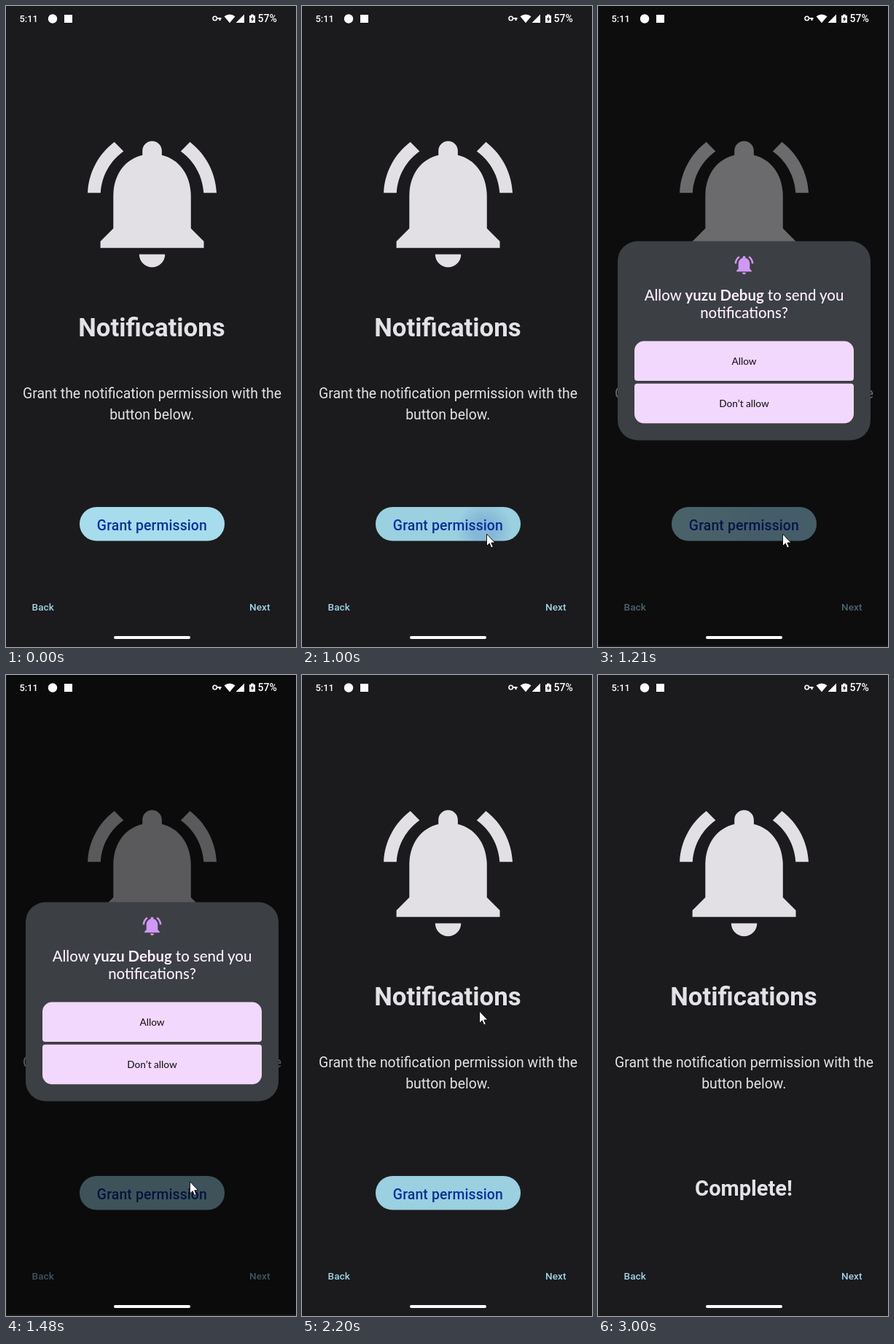
These frames come from a looping animation (398x879 px, 3.54 s). An HTML page:

```html
<!DOCTYPE html>
<html lang="en">
<head>
<meta charset="utf-8">
<title>Notification permission</title>
<style>
  html, body { margin: 0; height: 100%; overflow: hidden; background: #1b1b1d; }
  svg { display: block; width: 100vw; height: 100vh; font-family: Roboto, sans-serif; fill: #e3e2e6; }
  .mid { text-anchor: middle; }
  .body { font-size: 19.4px; }
  .nav { font-size: 13.55px; font-weight: 500; fill: #a0d3e6; letter-spacing: .007em; }
  .status { fill: #fff; font-weight: 500; }
  #dialog { font-family: Lato, sans-serif; fill: #fbeeff; }
  #dialog .title { font-size: 20.4px; font-weight: 500; }
  #dialog .label { font-size: 13.6px; font-weight: 500; fill: #1c1b1f; }
</style>
</head>
<body>
<svg viewBox="0 0 398 879">
  <defs>
    <path id="bell" d="M7.58 4.08 6.15 2.65C3.75 4.48 2.17 7.3 2.03 10.5h2c.15-2.65 1.51-4.97 3.55-6.42zm12.39 6.42h2c-.15-3.2-1.73-6.02-4.12-7.85l-1.42 1.43c2.02 1.45 3.39 3.77 3.54 6.42zM18 11c0-3.07-1.64-5.64-4.5-6.32V4c0-.83-.67-1.5-1.5-1.5s-1.5.67-1.5 1.5v.68C7.63 5.36 6 7.92 6 11v5l-2 2v1h16v-1l-2-2zM12 22c1.1 0 2-.9 2-2h-4c0 1.1.9 2 2 2z"/>
    <clipPath id="pill"><rect x="101" y="687" width="199" height="46.500" rx="23.2"/></clipPath>
    <radialGradient id="glow">
      <stop offset=".4" stop-color="#0a2f9c"/>
      <stop offset="1" stop-color="#0a2f9c" stop-opacity="0"/>
    </radialGradient>
  </defs>

  <use href="#bell" transform="translate(94.1 163.1) scale(8.87)" fill="#e2e0e5"/>
  <g class="mid">
    <text x="200" y="453" font-size="34.85" font-weight="700">Notifications</text>
    <text class="body" x="200.5" y="537.5">Grant the notification permission with the</text>
    <text class="body" x="200.2" y="566.5">button below.</text>
    <text id="complete" x="200" y="714" font-size="29.05" font-weight="700">Complete!</text>
    <g id="button">
      <g clip-path="url(#pill)">
        <rect x="101" y="687" width="199" height="47" fill="#a6dcec"/>
        <rect id="hover" x="101" y="687" width="199" height="47" fill="#00344f"/>
        <circle id="ripple" cx="250" cy="718" fill="url(#glow)"/>
      </g>
      <text x="200.4" y="718.500" font-size="19.36" font-weight="500" letter-spacing=".14" fill="#0a2f9c">Grant permission</text>
    </g>
  </g>
  <text class="nav" x="35.500" y="829">Back</text>
  <text class="nav" x="334" y="829">Next</text>

  <rect id="dim" x="1" width="397" height="877" fill="#000"/>

  <g class="status">
    <text x="18.500" y="22" font-size="12.8">5:11</text>
    <circle cx="64" cy="17.500" r="6.200"/>
    <rect x="80" y="12" width="11" height="11"/>
    <path d="M290 17h5.500M293.500 17v3" stroke="#fff" stroke-width="2" fill="none"/>
    <circle cx="286.700" cy="17" r="2.700" stroke="#fff" stroke-width="1.600" fill="none"/>
    <path d="M299.500 14.200q7.500-5.600 15 0l-7.500 9zM327 11.500V23h-11.500z"/>
    <path d="M334 13h2.200v-1.500h3.600V13h2.200v10h-8z"/>
    <path d="M339 14l-3.200 4.500h2L337 22l3.400-4.700h-2z" fill="#1b1b1d"/>
    <text x="345.500" y="22" font-size="14">57%</text>
  </g>
  <rect x="148" y="864" width="105" height="4" rx="2" fill="#fff"/>

  <g id="dialog" class="mid">
    <rect x="27" width="347" height="272.800" rx="27" fill="#3c3f43"/>
    <use href="#bell" transform="translate(184.900 16.900) scale(1.3)" fill="#d197f8"/>
    <text class="title" x="200.5" y="81">Allow <tspan font-weight="700">yuzu Debug</tspan> to send you</text>
    <text class="title" x="200.5" y="105.500">notifications?</text>
    <g fill="#f3d8fd">
      <path d="M50 150a13 13 0 0 1 13-13h275a13 13 0 0 1 13 13v37.500a4 4 0 0 1-4 4H54a4 4 0 0 1-4-4z"/>
      <path d="M50 199.200a4 4 0 0 1 4-4h293a4 4 0 0 1 4 4v37.500a13 13 0 0 1-13 13H63a13 13 0 0 1-13-13z"/>
    </g>
    <text class="label" x="200.5" y="169">Allow</text>
    <text class="label" x="200.5" y="227.300">Don’t allow</text>
  </g>

  <path id="cursor" d="M.5 0V16.500L4.300 13 6.700 18.800 9.300 17.700 6.900 12H12z" fill="#fff" stroke="#111" stroke-linejoin="round"/>
</svg>
<script>
const LOOP = 3540, STEP = 200 / 3;
const el = Object.fromEntries([...document.querySelectorAll('[id]')].map(e => [e.id, e]));
const ramp = (t, from, to) => Math.min(1, Math.max(0, (t - from) / (to - from)));
const smooth = x => x * x * (3 - 2 * x);
const mix = (a, b, k) => a.map((v, i) => v + (b[i] - v) * k);
const show = (e, on) => e.setAttribute('visibility', on ? 'visible' : 'hidden');

const ENTRY = [333, 562], GRANT = [253, 724], ALLOW = [243, 461], EXIT = [361, 540];

function cursorAt(t) {
  if (t < 1340) return mix(ENTRY, GRANT, 1 - (1 - ramp(t, 400, 600)) ** 2);
  if (t < 2600) return mix(GRANT, ALLOW, smooth(ramp(t, 1340, 1950)));
  return mix(ALLOW, EXIT, ramp(t, 2600, 2733) ** 2);
}

function draw(t) {
  const open = t > 1060 && t < 2190;
  const done = smooth(ramp(t, 2200, 2430));

  show(el.cursor, t > 390 && t < 2790);
  el.cursor.setAttribute('transform', `translate(${cursorAt(t)})`);

  el.hover.setAttribute('opacity', .07 * ramp(t, 480, 620));
  el.ripple.setAttribute('r', 20 + 150 * ramp(t, 930, 1330) ** 1.2);
  el.ripple.setAttribute('opacity', .15 * ramp(t, 900, 1000) * (1 - ramp(t, 1080, 1300)));
  el.button.setAttribute('opacity', 1 - done);
  el.complete.setAttribute('opacity', done);

  show(el.dialog, open);
  el.dialog.setAttribute('transform', `translate(0 ${311.5 + 114.5 * Math.exp((1067 - t) / 57)})`);
  el.dim.setAttribute('opacity', t < 2190 ? .6 * ramp(t, 1027, 1225) : 0);
}

// The picture advances at 15 steps per second.
function tick() {
  const t = performance.now() % LOOP;
  draw(Math.floor((t + 4) / STEP) * STEP);
  requestAnimationFrame(tick);
}
tick();
</script>
</body>
</html>
```
